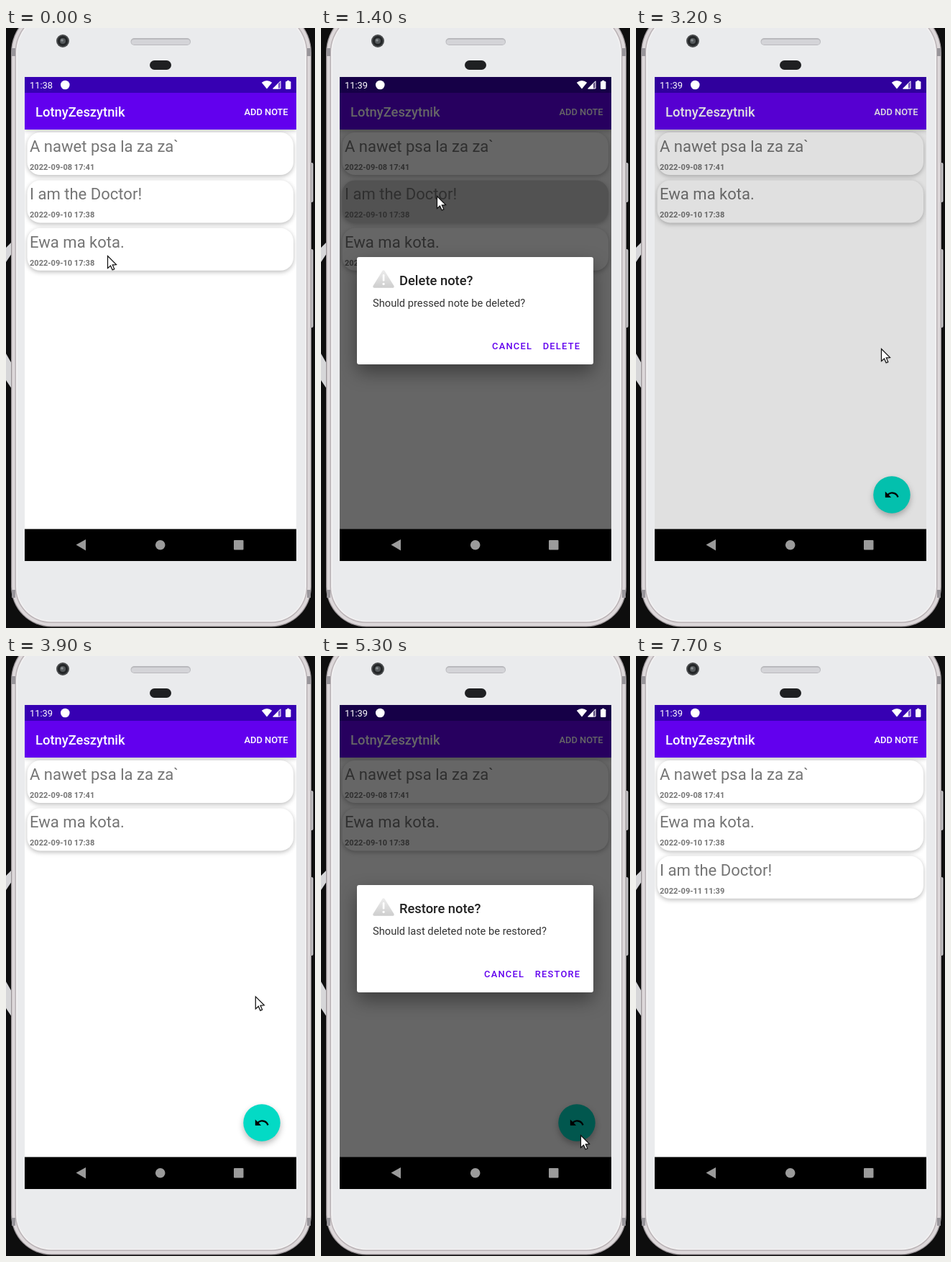
An HTML page with a canvas for the animation above (8.4 s loop, 430 by 833 pixels).

```html
<!DOCTYPE html>
<html lang="en">
<head>
<meta charset="utf-8">
<title>Notes app</title>
<style>
html, body { margin: 0; width: 100%; height: 100%; overflow: hidden; background: #0e0e0e; }
canvas { display: block; width: 430px; height: 833px; }
</style>
</head>
<body>
<canvas id="stage"></canvas>
<script>
const LOOP = 8400, STEP = 100;
const DP = 378 / 411.4;
const PURPLE = '#6200ee';
const canvas = document.getElementById('stage');
const ratio = window.devicePixelRatio || 1;
canvas.width = 430 * ratio;
canvas.height = 833 * ratio;
const ctx = canvas.getContext('2d');

// pointer: each move is an eased curve from the previous rest point
const HOME = [141, 316];
const moves = [
  { at: 0, dur: 400, via: [143, 270], to: [161, 233] },
  { at: 1700, dur: 700, via: [290, 545], to: [339, 447] },
  { at: 3000, dur: 100, via: [340, 446], to: [341, 445] },
  { at: 3800, dur: 700, via: [396, 700], to: [361, 665] },
  { at: 5500, dur: 600, via: [310, 430], to: [340, 443] },
  { at: 6600, dur: 400, via: [300, 290], to: [195, 142] },
  { at: 7200, dur: 500, via: [115, 75], to: [35, -30] }
];
const dialogs = [
  { open: 1200, shut: 3000, title: 'Delete note?', ask: 'Should pressed note be deleted?', yes: 'DELETE', yesX: 308.7 },
  { open: 5100, shut: 6500, title: 'Restore note?', ask: 'Should last deleted note be restored?', yes: 'RESTORE', yesX: 297.7 }
];

const ramp = (t, at, dur) => Math.min(1, Math.max(0, (t - at) / dur));
const ease = k => k * k * (3 - 2 * k);

function pointerAt(t) {
  let p = HOME;
  for (const { at, dur, via, to } of moves) {
    if (t <= at) break;
    const k = ease(ramp(t, at, dur));
    p = p.map((a, i) => (1 - k) ** 2 * a + 2 * k * (1 - k) * via[i] + k * k * to[i]);
  }
  return p;
}

function rect(x, y, w, h, color) {
  ctx.fillStyle = color;
  ctx.fillRect(x, y, w, h);
}

function round(x, y, w, h, r, color) {
  ctx.beginPath();
  ctx.roundRect(x, y, w, h, r);
  ctx.fillStyle = color;
  ctx.fill();
}

function disc(x, y, r, color) {
  ctx.beginPath();
  ctx.arc(x, y, r, 0, Math.PI * 2);
  ctx.fillStyle = color;
  ctx.fill();
}

function poly(points, color) {
  ctx.beginPath();
  points.forEach(([x, y]) => ctx.lineTo(x, y));
  ctx.closePath();
  ctx.fillStyle = color;
  ctx.fill();
}

function text(str, x, y, sp, weight, color, spacing = 0) {
  ctx.font = `${weight} ${sp * DP}px Roboto, sans-serif`;
  ctx.letterSpacing = spacing + 'px';
  ctx.fillStyle = color;
  ctx.fillText(str, x, y);
}

function shadow(alpha, blur, dy) {
  ctx.shadowColor = `rgba(0,0,0,${alpha})`;
  ctx.shadowBlur = blur * ratio;
  ctx.shadowOffsetY = dy * ratio;
}

function noShadow() {
  ctx.shadowColor = 'transparent';
}

function body(inset, color) {
  const top = 62 - inset, bottom = 56 - inset;
  round(7 + inset, -28 + inset, 418 - 2 * inset, 859.5 - 2 * inset, [top, top, bottom, bottom], color);
}

function drawPhone() {
  rect(0, 0, 430, 833, '#0e0e0e');
  poly([[0, 305], [8, 297], [8, 313], [0, 325]], '#d6d6d8');
  poly([[0, 452], [8, 466], [8, 501], [0, 489]], '#d6d6d8');
  round(421, 187, 6.5, 55, 2, '#c6c4c7');
  round(421, 307, 6.5, 109, 2, '#c6c4c7');
  body(0, '#9d979a');
  body(1.3, '#ddd8da');
  body(5.5, '#b9b2b5');
  body(7, '#f1f0f1');
  body(9, '#eaebed');
  for (const y of [28, 780]) {
    rect(8, y, 5, 11, '#98959a');
    rect(419, y, 5, 11, '#98959a');
  }
  round(173.5, 14, 83.5, 10, 5, '#b9b9bd');
  round(174.5, 16, 81.5, 7, 3.5, '#d4d4d8');
  round(200, 45, 30, 13, 6.5, '#1f2022');
  disc(79, 18, 9, '#4a4c4e');
  disc(79, 18, 7, '#232527');
  disc(79, 18, 4, '#55595c');
  disc(78, 17, 1.8, '#8b9093');
}

function drawCard(i, title, date, pressed) {
  const y = 145 + i * 66.4;
  shadow(.27, 6, 2);
  round(29.5, y, 370.5, 59, 18, pressed ? '#cfcfcf' : '#fff');
  noShadow();
  text(title, 33, y + 27, 24, 400, '#757575');
  text(date, 33, y + 52, 12, 700, '#757575');
}

function drawFab(pressed) {
  shadow(.28, pressed ? 14 : 8, pressed ? 7 : 4);
  disc(356, 648, 28 * DP, pressed ? '#03a897' : '#03dac5');
  noShadow();
  ctx.save();
  ctx.translate(356 - 12 * DP, 648 - 12 * DP);
  ctx.scale(DP, DP);
  ctx.fillStyle = '#000';
  ctx.fill(new Path2D('M12.5 8c-2.65 0-5.05.99-6.9 2.6L2 7v9h9l-3.62-3.62c1.39-1.16 3.16-1.88 5.12-1.88 3.54 0 6.55 2.31 7.6 5.5l2.37-.78C21.08 11.03 17.15 8 12.5 8z'));
  ctx.restore();
}

function drawStatus(clock) {
  text(clock, 33, 83.7, 14, 400, '#fff');
  disc(82.3, 79, 6.3, '#fff');
  ctx.beginPath();
  ctx.moveTo(363, 84.5);
  ctx.lineTo(355.8, 75.7);
  ctx.quadraticCurveTo(363, 70.3, 370.2, 75.7);
  ctx.closePath();
  ctx.fillStyle = '#fff';
  ctx.fill();
  poly([[371, 84.5], [379, 76.5], [379, 84.5]], '#fff');
  poly([[371.8, 84], [382, 73.8], [382, 84]], 'rgba(255,255,255,.3)');
  ctx.strokeStyle = '#fff';
  ctx.lineWidth = 1;
  ctx.stroke();
  round(389, 74, 7.4, 11, 1.2, '#fff');
  rect(391.2, 72.8, 3, 2, '#fff');
}

function drawNav() {
  rect(26, 695.6, 378, 44.4, '#000');
  poly([[97.5, 717.5], [111, 710], [111, 725.5]], '#9b9b9b');
  disc(214.7, 717.7, 6.8, '#9b9b9b');
  round(317, 711, 13.5, 13.5, 1, '#9b9b9b');
}

function drawWarning() {
  const fill = ctx.createLinearGradient(0, 336, 0, 361);
  fill.addColorStop(0, '#ededed');
  fill.addColorStop(1, '#cdcdcd');
  poly([[87, 338], [100, 359], [74, 359]], fill);
  ctx.lineJoin = 'round';
  ctx.lineWidth = 3.5;
  ctx.strokeStyle = fill;
  ctx.stroke();
  round(85.8, 342, 2.6, 9.5, 1.2, '#fff');
  disc(87.1, 355.3, 1.6, '#fff');
}

function drawDialog({ title, ask, yes, yesX }, alpha) {
  ctx.save();
  ctx.globalAlpha = alpha;
  shadow(.4 * alpha, 26, 11);
  round(50, 318, 329, 149, 3, '#fff');
  noShadow();
  drawWarning();
  text(title, 109, 356.5, 20, 500, '#212121');
  text(ask, 72, 387, 16, 400, '#333');
  text('CANCEL', yesX - 70.7, 446, 14, 500, PURPLE, 1.25);
  text(yes, yesX, 446, 14, 500, PURPLE, 1.25);
  ctx.restore();
}

function drawPointer(x, y) {
  ctx.save();
  ctx.translate(x + .5, y + .5);
  shadow(.3, 2, 1);
  poly([[0, 0], [0, 17], [4, 13.4], [6.6, 19.3], [9.3, 18.1], [6.7, 12.4], [12, 12]], '#fff');
  noShadow();
  ctx.lineJoin = 'miter';
  ctx.lineWidth = 1.2;
  ctx.strokeStyle = '#111';
  ctx.stroke();
  ctx.restore();
}

function drawList(t) {
  const [remove, restore] = dialogs;
  const doctor = 'I am the Doctor!';
  const cat = ['Ewa ma kota.', '2022-09-10 17:38'];
  drawCard(0, 'A nawet psa la za za`', '2022-09-08 17:41');
  if (t <= remove.shut) {
    drawCard(1, doctor, '2022-09-10 17:38', t >= remove.open);
    drawCard(2, ...cat);
    return;
  }
  drawCard(1, ...cat);
  if (t >= restore.shut) drawCard(2, doctor, '2022-09-11 11:39');
  else drawFab(Math.abs(t - 5000) <= 100);
}

function draw(t) {
  const active = dialogs[t < 4000 ? 0 : 1];
  const opened = ramp(t, active.open, 200);
  const dim = .6 * opened * (1 - ramp(t, active.shut, 250));
  const alpha = opened * (1 - ramp(t, active.shut, 120));
  ctx.setTransform(ratio, 0, 0, ratio, 0, 0);
  drawPhone();

  ctx.save();
  ctx.beginPath();
  ctx.rect(26, 68, 378, 672);
  ctx.clip();
  rect(26, 141, 378, 555, '#fff');
  shadow(.22, 6, 2);
  rect(26, 90, 378, 51, PURPLE);
  noShadow();
  rect(26, 68, 378, 22, '#3700b3');
  text('LotnyZeszytnik', 41, 122.7, 20, 500, '#fff');
  text('ADD NOTE', 331.5, 120.5, 14, 500, '#fff');
  drawList(t);
  rect(26, 68, 378, 628, `rgba(0,0,0,${dim})`);
  drawStatus(t < 100 ? '11:38' : '11:39');
  drawNav();
  if (alpha > 0) drawDialog(active, alpha);
  ctx.restore();

  drawPointer(...pointerAt(t));
}

const start = performance.now();
function tick() {
  const t = (performance.now() - start) % LOOP;
  draw(Math.floor(t / STEP) * STEP);
  requestAnimationFrame(tick);
}
tick();
</script>
</body>
</html>
```
